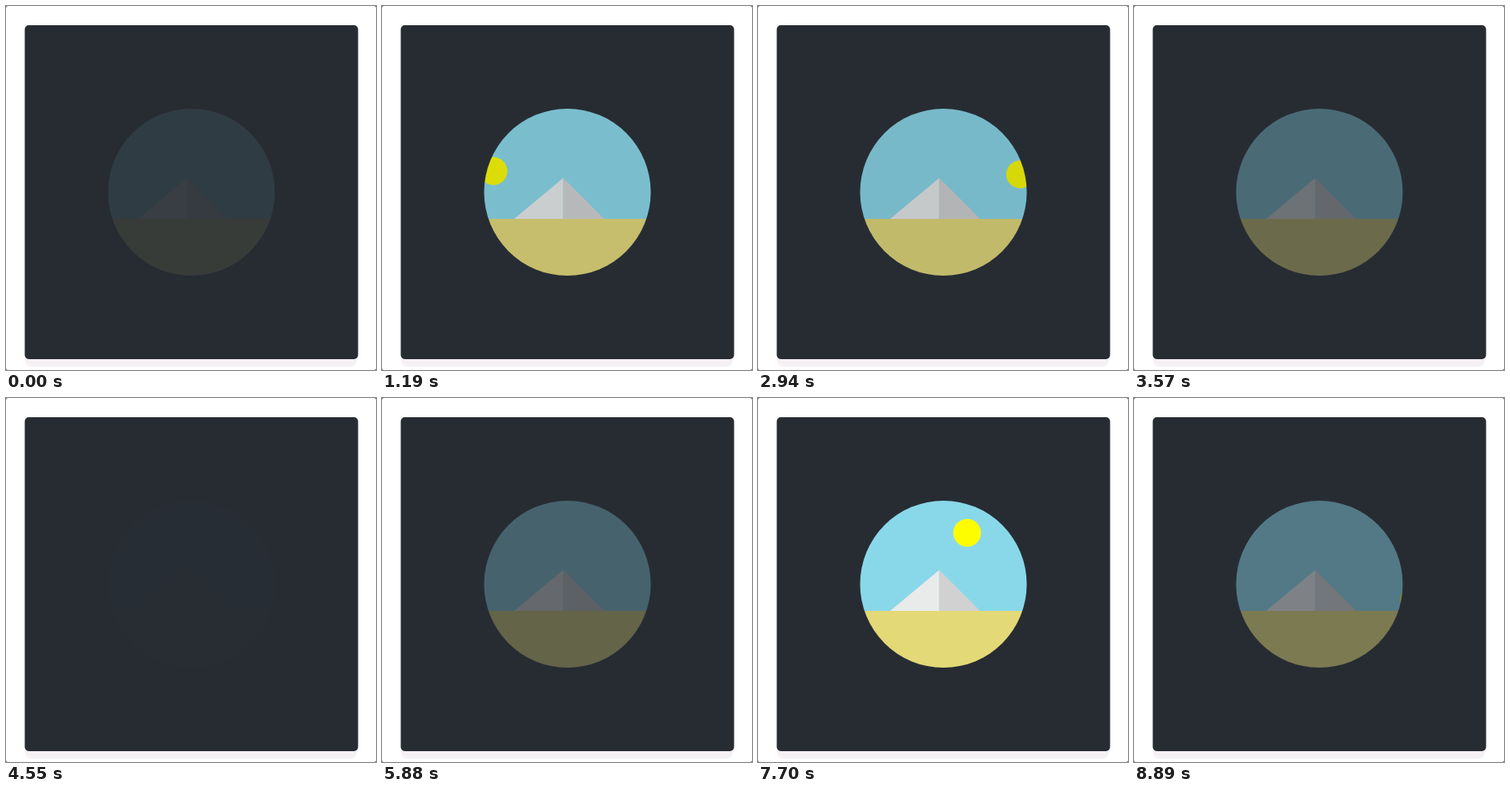
An HTML page that plays this animation: 444 by 436 pixels, repeating every 8.96 s.

```html
<!DOCTYPE html>
<html lang="en">
<head>
<meta charset="utf-8">
<title>Pyramid day</title>
<style>
  html, body { margin: 0; width: 100%; height: 100%; overflow: hidden; background: #fff; }
  svg { display: block; width: 444px; height: 436px; }
</style>
</head>
<body>
<svg viewBox="0 0 444 436">
  <defs>
    <clipPath id="disc"><circle cx="222.5" cy="223" r="100"/></clipPath>
  </defs>
  <rect width="444" height="436" fill="#555"/>
  <rect width="444" height="436" rx="2.5" fill="#fff"/>
  <rect x="23" y="410" width="398" height="22" rx="8" fill="#f4f0f4"/>
  <rect x="22.5" y="23" width="400" height="400" rx="5" fill="#272c33"/>
  <g id="scene" clip-path="url(#disc)">
    <rect x="122" y="122" width="202" height="134" fill="#8bdaec"/>
    <circle id="sun" cx="222.5" cy="158" r="16.7" fill="#ff0"/>
    <path d="M217.5 206 L158 255.5 H217.5 Z" fill="#ebeded"/>
    <path d="M217.5 206 L267 255.5 H217.5 Z" fill="#d3d3d3"/>
    <rect x="122" y="255" width="202" height="70" fill="#e5db78"/>
  </g>
</svg>
<script>
  const LOOP = 8960, STEP = 70;
  const DAY = 5430, DAY_OFFSET = 675;
  const SWING = 95;

  const scene = document.getElementById('scene');
  const sun = document.getElementById('sun');

  // Cubic bezier easing with control points (x1, 0) and (x2, 1).
  function ease(x, x1, x2) {
    let low = 0, high = 1;
    for (let i = 0; i < 24; i++) {
      const s = (low + high) / 2, r = 1 - s;
      if (3 * r * r * s * x1 + 3 * r * s * s * x2 + s * s * s < x) low = s;
      else high = s;
    }
    return low * low * (3 - 2 * low);
  }

  function draw(time) {
    const t = Math.floor((time % LOOP) / STEP) * STEP;
    const day = ((t + DAY_OFFSET) % DAY) / DAY;
    const light = 1 - Math.abs(2 * day - 1);
    const angle = SWING * (2 * ease(day, 0.42, 0.58) - 1);
    scene.setAttribute('opacity', ease(light, 0.55, 0.45).toFixed(4));
    sun.setAttribute('transform', `rotate(${angle.toFixed(3)} 222.5 277)`);
  }

  const start = performance.now();
  function tick() {
    draw(performance.now() - start);
    requestAnimationFrame(tick);
  }
  tick();
</script>
</body>
</html>
```
